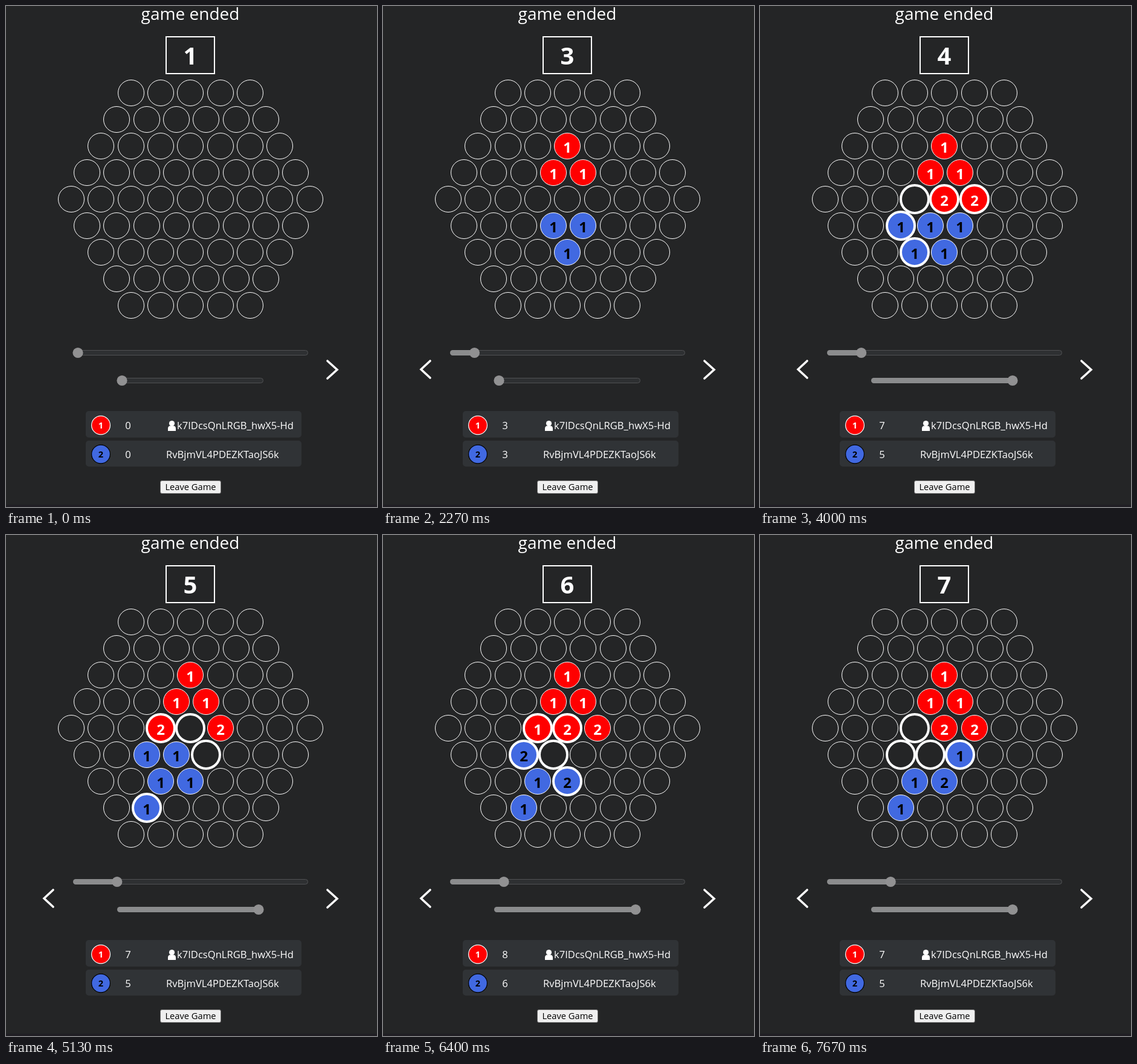
An HTML page for the animation above (8000 ms loop, 614x830 px).

```html
<!DOCTYPE html>
<html>
<head>
<meta charset="utf-8">
<style>
  html, body { margin: 0; height: 100%; overflow: hidden; background: #242526; }
  svg { display: block; font-family: "Open Sans", sans-serif; font-size: 16.6px; fill: #fff; }
  .mid { text-anchor: middle; }
  .bold { text-anchor: middle; font-weight: 700; }
  .arrow { fill: none; stroke: #fff; stroke-width: 3.6; stroke-linecap: round; }
</style>
</head>
<body>
<svg id="stage" width="614" height="830" viewBox="0 0 614 830">
  <rect y="826" width="614" height="4" fill="#201f24"/>
  <text class="mid" x="305" y="23" font-size="28">game ended</text>
  <rect x="265" y="51" width="80" height="61" fill="none" stroke="#fff" stroke-width="2"/>
  <text class="bold" id="turn" x="305" y="97" font-size="40"></text>
  <g id="board"></g>
  <g id="sliders"></g>
  <path class="arrow" id="back" d="M78 588L63 602L78 616"/>
  <path class="arrow" d="M532 588L548 602.5L532 617"/>

  <rect x="132" y="671" width="357" height="44" rx="5" fill="#303336"/>
  <circle cx="157" cy="694.5" r="15.4" fill="red" stroke="#fff" stroke-width="1.2"/>
  <text class="bold" x="157" y="700" font-size="14.5">1</text>
  <text class="mid" id="red" x="202" y="701"></text>
  <circle cx="274.5" cy="691.5" r="4.6"/>
  <path d="M268 704V700Q268 696 271.5 695.5H277.5Q281 696 281 700V704Z"/>
  <text x="283" y="701">k7IDcsQnLRGB_hwX5-Hd</text>

  <rect x="132" y="720" width="357" height="43" rx="5" fill="#303336"/>
  <circle cx="157" cy="742.5" r="15.4" fill="#4169e1" stroke="#000" stroke-width="1.2"/>
  <text class="bold" x="157" y="748" font-size="14.5" fill="#000">2</text>
  <text class="mid" id="blue" x="202" y="749"></text>
  <text x="265" y="749">RvBjmVL4PDEZKTaoJS6k</text>

  <rect x="255.5" y="786.5" width="100" height="21" rx="2.5" fill="#efefef" stroke="#767676"/>
  <text class="mid" x="305.5" y="802" font-size="14.7" fill="#000">Leave Game</text>
</svg>
<script>
const $ = id => document.getElementById(id);

function add(parent, tag, attrs) {
  const node = document.createElementNS("http://www.w3.org/2000/svg", tag);
  set(node, attrs);
  return parent.appendChild(node);
}
function set(node, attrs) {
  for (const key in attrs) node.setAttribute(key, attrs[key]);
}

// Cell key is row * 10 + column.
const cells = {};
for (let row = 0; row < 9; row++) {
  const count = 9 - Math.abs(row - 4);
  const center = row % 2 ? 306.7 : 305.35;
  for (let col = 0; col < count; col++) {
    const x = Math.round(center + (col - (count - 1) / 2) * 49.3);
    const y = 144 + row * 44;
    cells[row * 10 + col] = {
      ring: add($("board"), "circle", { cx: x, cy: y, stroke: "#fff" }),
      label: add($("board"), "text", { class: "bold", x, y: y + 11, "font-size": 24 })
    };
  }
}

function makeSlider(left, right, y) {
  const bar = { y: y - 4.5, height: 9, rx: 4.5, x: left };
  add($("sliders"), "rect", { x: left + .5, y: y - 4, width: right - left - 1, height: 8, rx: 4,
    fill: "#2e3032", stroke: "#505153" });
  const fill = add($("sliders"), "rect", { ...bar, fill: "#8b8c8d" });
  const thumb = add($("sliders"), "circle", { cy: y, r: 8.6, fill: "#919192" });
  return x => {
    set(fill, { width: x - left });
    set(thumb, { cx: x });
  };
}
const turnSlider = makeSlider(111, 500, 574.5);
const stepSlider = makeSlider(184, 426, 620.5);

// New cell values per turn: positive is red, negative is blue.
const turns = [
  { 23: 1, 63: -1 },
  { 33: 1, 34: 1, 53: -1, 54: -1 },
  { 44: 1, 45: 1 },
  { 43: 0, 44: 2, 45: 2, 52: -1, 62: -1 },
  { 43: 2, 44: 0, 54: 0, 71: -1 },
  { 43: 1, 44: 2, 52: -2, 53: 0, 63: -2 },
  { 43: 0, 52: 0, 53: 0, 54: -1 }
];
const starts = [0, 470, 1070, 1670, 2270, 2870, 3470, 4000, 4600, 5130, 5800, 6400, 7000, 7670];

function show(step) {
  const turn = step >> 1, played = step % 2;
  const values = Object.assign({}, ...turns.slice(0, turn + played));
  const touched = played ? turns[turn] : {};
  let red = 0, blue = 0;
  for (const key in cells) {
    const value = values[key] || 0, lit = key in touched;
    if (value > 0) red += value; else blue -= value;
    set(cells[key].ring, {
      r: lit ? 23 : 21.5,
      "stroke-width": lit ? 4 : 1,
      fill: value > 0 ? "red" : value < 0 ? "#4169e1" : "none"
    });
    set(cells[key].label, { fill: value < 0 ? "#000" : "#fff" });
    cells[key].label.textContent = Math.abs(value) || "";
  }
  $("turn").textContent = turn + 1;
  $("red").textContent = red;
  $("blue").textContent = blue;
  $("back").style.visibility = step ? "visible" : "hidden";
  turnSlider(119 + turn * 16.2);
  stepSlider(played ? 418 : 192);
}

let current = -1;
function frame() {
  const time = performance.now() % 8000;
  const step = starts.filter(start => start <= time).length - 1;
  if (step !== current) show(current = step);
  requestAnimationFrame(frame);
}
frame();
</script>
</body>
</html>
```
